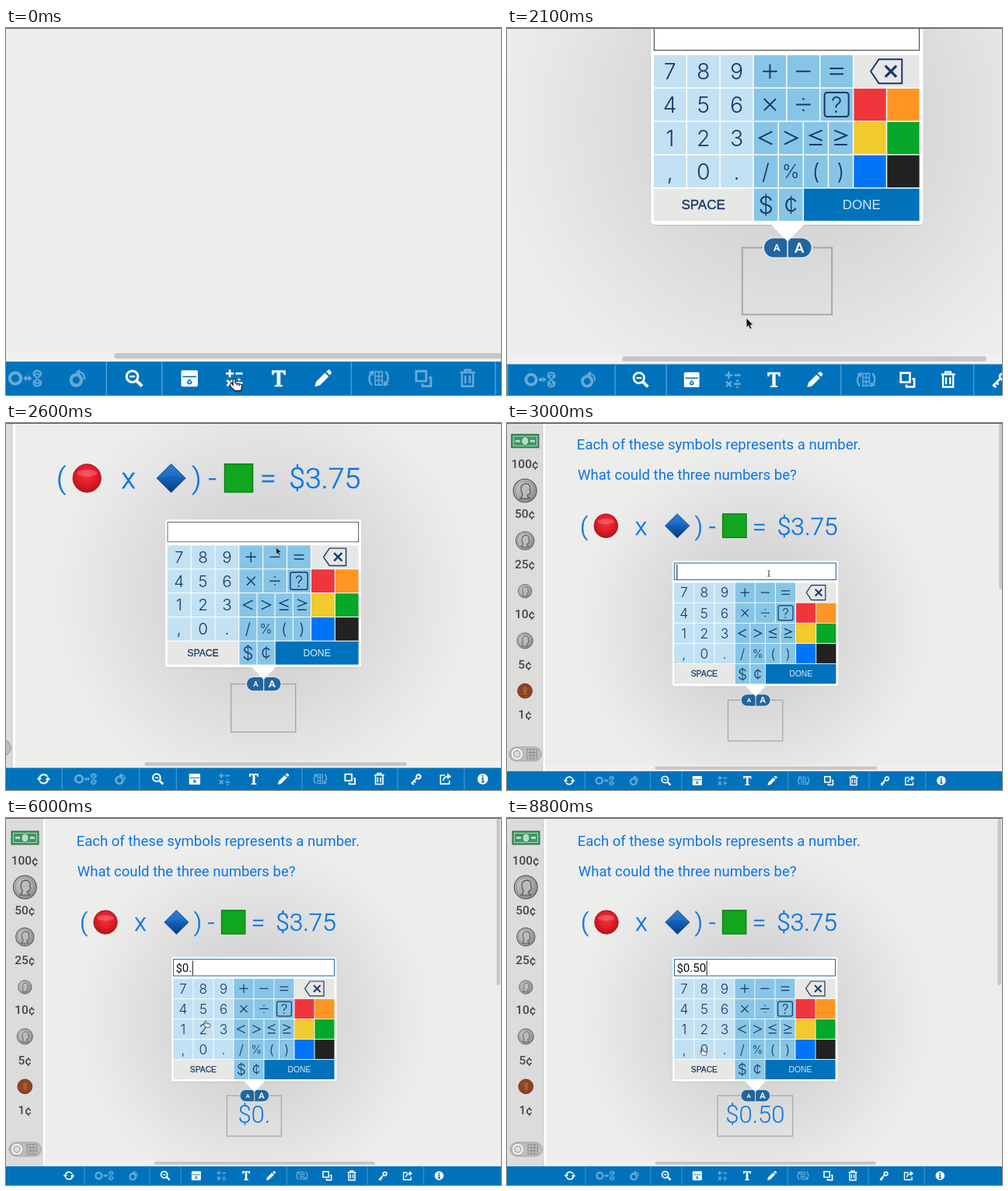
These frames come from a looping animation (637 by 472 pixels, 8.9 s). An HTML page:

```html
<!DOCTYPE html>
<html lang="en">
<head>
<meta charset="utf-8">
<title>Symbol puzzle keypad</title>
<style>
  html, body { margin: 0; width: 100%; height: 100%; overflow: hidden; background: #ededeb; }
  svg { display: block; width: 637px; height: 472px; }
  text { font-family: Roboto, "Liberation Sans", sans-serif; white-space: pre; }
  .mid { text-anchor: middle; }
  .blue { fill: #0a75e6; }
  .price { font-size: 15.4px; font-weight: 500; fill: #444; text-anchor: middle; }
  .key { font-family: Inter, "Liberation Sans", sans-serif; font-weight: 300; fill: #17386a; text-anchor: middle; }
  .word { font-family: "Liberation Sans", Arial, sans-serif; font-weight: 400; }
  .op { fill: none; stroke: #17386a; }
  .line { fill: none; stroke: #fff; }
  .solid { fill: #fff; }
  .dim { opacity: .4; }
  .cursor { stroke-linejoin: round; }
</style>
</head>
<body>
<svg viewBox="0 0 637 472">
  <defs>
    <radialGradient id="shade">
      <stop offset="0" stop-color="#cfcfcf"/>
      <stop offset=".4" stop-color="#d6d6d6"/>
      <stop offset=".65" stop-color="#e0e0e0"/>
      <stop offset=".85" stop-color="#e8e8e8"/>
      <stop offset="1" stop-color="#ededeb"/>
    </radialGradient>
    <radialGradient id="ball" cx=".5" cy=".4" r=".65">
      <stop offset="0" stop-color="#ee3a44"/>
      <stop offset=".5" stop-color="#e01e28"/>
      <stop offset="1" stop-color="#ab0f17"/>
    </radialGradient>
    <linearGradient id="gem" x2="0" y2="1">
      <stop offset="0" stop-color="#2179d0"/>
      <stop offset=".5" stop-color="#1460b8"/>
      <stop offset="1" stop-color="#0a3a80"/>
    </linearGradient>
    <linearGradient id="silver" x2="1" y2="1">
      <stop offset="0" stop-color="#d0d0d0"/>
      <stop offset="1" stop-color="#8c8c8c"/>
    </linearGradient>
    <g id="coin">
      <circle r="9.5" fill="url(#silver)" stroke="#5f5f5f" stroke-width=".9"/>
      <circle r="7.9" fill="none" stroke="#858585" stroke-width=".6"/>
      <path d="M-4 6.5Q-1 4-2.6 1.5Q-5-5 .8-5.8Q5-5.4 4-1L4.6 1L3.6 3Q1.5 3 2 4.5L4 6.5Z" fill="#bcbcbc" stroke="#606060" stroke-width=".9"/>
    </g>
  </defs>

  <rect width="637" height="472" fill="#ededeb"/>
  <g id="world">
    <circle class="pop" cx="319.3" cy="259" r="230" fill="url(#shade)"/>

    <g class="blue">
      <text x="90.7" y="35.9" font-size="18.5">Each of these symbols represents a number.</text>
      <text x="91.8" y="75" font-size="18.5">What could the three numbers be?</text>
      <g font-size="31.6" font-weight="300" stroke="#0a75e6" stroke-width=".4">
        <text class="mid" x="100" y="145.3">(</text>
        <text class="mid" x="173" y="145.3">x</text>
        <text class="mid" x="247" y="145.3">)</text>
        <text class="mid" x="264" y="145.3">-</text>
        <text class="mid" x="324.5" y="145.3">=</text>
        <text x="347.2" y="145.3">$3.75</text>
      </g>
    </g>
    <circle cx="128" cy="134" r="15.3" fill="url(#ball)" stroke="#a3161c" stroke-width=".7"/>
    <ellipse cx="128" cy="128.5" rx="11" ry="3.6" fill="#ff9a9a" opacity=".35"/>
    <path d="M219.3 118.5L235 134L219.3 149.5L203.7 134Z" fill="url(#gem)" stroke="#0c4388" stroke-width=".7"/>
    <path d="M219.3 119L234 133.5L219.3 131L204.5 133.5Z" fill="#58a8ee" opacity=".15"/>
    <rect x="277.4" y="118.7" width="30.4" height="30.4" fill="#10a61e" stroke="#087a14" stroke-width="1.2"/>

    <!-- money tray -->
    <rect x="47" y="0" width="3.2" height="448" fill="#fff"/>
    <rect width="47.2" height="448" fill="#dcdcdb"/>
    <path d="M47 0V448" stroke="#c2c2c2" stroke-width=".7"/>
    <rect x="7" y="17" width="35" height="17" fill="#3f9464" stroke="#276c47"/>
    <rect x="9.5" y="19.5" width="30" height="12" fill="none" stroke="#a8d5b7"/>
    <ellipse cx="24.5" cy="25.5" rx="4.5" ry="5.5" fill="#b6dcc2" stroke="#276c47" stroke-width=".7"/>
    <path d="M12 25.5H18M31 25.5H37" stroke="#b6dcc2" stroke-width="3"/>
    <use href="#coin" transform="translate(24.3 89) scale(1.56)"/>
    <use href="#coin" transform="translate(24.3 153) scale(1.22)"/>
    <use href="#coin" transform="translate(24.3 217.5) scale(.92)"/>
    <use href="#coin" transform="translate(24.3 281) scale(1.06)"/>
    <circle cx="24.3" cy="345.3" r="9.4" fill="#8f4524" stroke="#5f2a14" stroke-width=".8"/>
    <path d="M20 351Q23 348 21 345Q20 339 25 339Q29 340 28 345L27 348L29 351Z" fill="#a85a34" stroke="#64301a" stroke-width=".6"/>
    <g id="prices"></g>
    <rect x="4" y="417" width="41.5" height="18" rx="9" fill="#bdbdbd" stroke="#999" stroke-width=".8"/>
    <circle cx="14" cy="426" r="7.6" fill="#f4f4f4" stroke="#999" stroke-width=".7"/>
    <circle cx="14" cy="426" r="4.2" fill="#ddd" stroke="#888"/>
    <g fill="none" stroke="#777"><rect x="27" y="419.8" width="12.5" height="12.5" stroke-dasharray="2 1"/><path d="M28 424H39M28 428H39M31.3 420V432M35.3 420V432" stroke-width=".7"/></g>

    <!-- scrollbars -->
    <rect x="50.2" y="440.5" width="586.8" height="7.5" fill="#f0f0ef"/>
    <rect x="190.5" y="441.8" width="284.5" height="4" rx="2" fill="#c6c6c6"/>
    <rect x="631.3" y="1" width="4.6" height="214" rx="2.2" fill="#c8c8c8"/>

    <!-- toolbar -->
    <rect y="448" width="637" height="25" fill="#0072bc"/>
    <path d="M101 448V472M185 448V472M225 448V472M361.3 448V472M465 448V472M537.3 448V472" stroke="#4a9dd2" stroke-width=".9"/>
    <g stroke-width="1.7">
      <g transform="translate(81 460)">
        <path class="line" d="M-4.6-1A4.7 4.7 0 0 1 4-2.5M4.6 1A4.7 4.7 0 0 1-4 2.5"/>
        <path class="solid" d="M-7.4-1H-2L-4.7 2.6ZM7.4 1H2L4.7-2.6Z"/>
      </g>
      <g class="dim" transform="translate(126 460)">
        <circle class="line" cx="-6.6" r="4" stroke-width="2.3"/>
        <path class="line" d="M0 0H4" stroke-width="1.2"/>
        <path class="solid" d="M-1 0L1.6-2.2V2.2ZM5.4 0L2.8-2.2V2.2Z"/>
        <path class="line" d="M7-1.5Q5.5-5 9-5.6Q13-5 11.5-1.5M7 1.5Q5.5 5 9 5.6Q13 5 11.5 1.5" stroke-width="1.3"/>
        <circle class="line" cx="9.2" cy="-2" r="1.5" stroke-width="1"/><circle class="line" cx="9.2" cy="2.2" r="1.5" stroke-width="1"/>
      </g>
      <g class="dim" transform="translate(164 460)">
        <circle class="line" cx="-.8" cy="1.3" r="3.8" stroke-width="2.3"/>
        <path class="line" d="M1-4.4Q5.5-4.5 5.2 1" stroke-width="1.2"/>
        <path class="solid" d="M-1.4-4.3L2-6.6V-2.2Z"/>
      </g>
      <g class="line" transform="translate(205 460)">
        <circle cx="-1.4" cy="-1.3" r="4.1"/><path d="M-3.4-1.3H.6" stroke-width="1.3"/><path d="M1.7 1.8L5.6 5.6" stroke-width="2.3"/>
      </g>
      <g transform="translate(244.8 460)">
        <rect class="solid" x="-6" y="-5.8" width="12" height="11.8" rx="1"/>
        <path d="M-5-1.2H5" stroke="#0072bc" stroke-width=".9"/>
        <path d="M0 .3L1.8 2.6Q1.6 4.4 0 4.4Q-1.6 4.4-1.8 2.6Z" fill="#0072bc"/>
        <circle class="solid" cy="2.7" r=".7"/>
      </g>
      <path id="calc" class="line" transform="translate(277 460)" d="M-6-3.5H-.4M-3.2-6.3V-.7M1-3.5H6M-5.2 1.4L-1.2 5.4M-1.2 1.4L-5.2 5.4M1 3.4H6M2.7 .9H4.3M2.7 5.9H4.3" stroke-width="1.5"/>
      <path class="solid" transform="translate(309 460)" d="M-5-5.8H5V-2.4H3.8Q3.5-4.4 1.3-4.4V4.6L2.9 5V6H-2.9V5L-1.3 4.6V-4.4Q-3.5-4.4-3.8-2.4H-5Z"/>
      <path class="solid" transform="translate(341 460)" d="M-6 6L-5 2.3L1.3-4L4 -1.3L-2.3 5ZM2.2-4.8L3.6-6Q4.5-6.4 5.3-5.4Q6.4-4.5 6-3.6L4.8-2.2Z"/>
      <g class="dim" transform="translate(381 460)">
        <path class="line" d="M-2.6-4.8H2.6V4.8H-2.6ZM-2.6-1.6H2.6M-2.6 1.6H2.6M0-4.8V4.8" stroke-width=".9"/>
        <path class="line" d="M-5 5Q-8.6 0-5-4M5-5Q8.6 0 5 4" stroke-width="1.4"/>
        <path class="solid" d="M-7.3-4.5L-3.4-5.8L-3.8-1.8ZM7.3 4.5L3.4 5.8L3.8 1.8Z"/>
      </g>
      <path class="line wake" transform="translate(413 460)" d="M-5-5.2H2.2V2H-5ZM4-.5H5.6V5.6H-.5V3.8" stroke-width="1.6"/>
      <path class="line wake" transform="translate(445 460)" d="M-5.4-4.2H5.4M-2-4.5V-6H2V-4.5M-4-4V5.7H4V-4M-1.6-1.8V3.6M1.6-1.8V3.6" stroke-width="1.4"/>
      <g class="line" transform="translate(485 460)">
        <circle cx="2.6" cy="-2.4" r="2.3"/><path d="M1-1L-5 5M-4.6 4.5L-2.5 6M-2.5 2.3L-.6 3.8"/>
      </g>
      <g transform="translate(516.5 460)">
        <path class="line" d="M0-4H-5V5.3H4.6V1.6M-2 2Q-1.5-2.5 3-2.8" stroke-width="1.4"/><path class="solid" d="M2.4-6.3L6.6-2.8L2.4 .6Z"/>
      </g>
      <circle class="solid" cx="557.3" cy="460" r="5.8"/>
      <path d="M557.3 456V457.7M556 459.2H557.4V463.3M555.8 463.3H559" fill="none" stroke="#0072bc" stroke-width="1.5"/>
    </g>

    <!-- answer box and keypad -->
    <g class="pop">
      <rect id="box" y="357" height="52.2" fill="none" stroke="#a6a6a9" stroke-width="1.2"/>
      <text id="answer" class="blue mid" x="319.3" y="391.6" font-size="31" font-weight="300"></text>
      <rect x="212.4" y="179.4" width="213.6" height="160.6" rx="4" opacity=".1"/>
      <path d="M306 338H333.4L319.7 352.5Z" fill="#fff"/>
      <rect x="212.8" y="178.8" width="212.8" height="160.3" rx="3.2" fill="#fff"/>
      <rect id="field" x="215.5" y="181.6" width="207" height="21.4" fill="#fff"/>
      <text id="typed" x="218.4" y="198" font-size="15" fill="#111"></text>
      <path id="caret" stroke="#111" stroke-width="1"/>
      <g id="keys" stroke-width="1.2"></g>
      <rect x="300.9" y="349.3" width="37.8" height="15.6" rx="7.8" fill="#22659f" stroke="#e4e8ec" stroke-width="1"/>
      <path d="M319.7 349V365" stroke="#e4e8ec" stroke-width="1"/>
      <path d="M314 346L319.7 352.5L325.4 346Z" fill="#fff"/>
      <g class="mid" fill="#eef4f9" font-weight="700"><text x="311.2" y="360" font-size="8">A</text><text x="328.8" y="361" font-size="11.5">A</text></g>
    </g>

    <g id="pointer" stroke-width=".6">
      <path class="cursor" data-kind="hand" d="M-.8 5V.9A.8.8 0 0 1 .8.9V3.3L4.6 4Q5.8 4.3 5.6 5.6L4.9 8.8H.8L-2.5 6Q-3-.1-.8 5ZM2.2 3.7V5M3.7 4V5.3" fill="#fff" stroke="#111"/>
      <path class="cursor" data-kind="arrow" d="M0 0V7.4L1.7 5.9L2.9 8.6L4.2 8L3 5.4H5.3Z" fill="#111" stroke="#eee" stroke-width=".4"/>
      <path class="cursor" data-kind="beam" d="M-1.6-3.8Q0-3.8 0-2.8Q0-3.8 1.6-3.8M0-2.8V2.8M-1.6 3.8Q0 3.8 0 2.8Q0 3.8 1.6 3.8M-.8.8H.8" fill="none" stroke="#222" stroke-width=".8"/>
    </g>
  </g>
  <rect width="637" height="1" fill="#5a5a5c"/>
</svg>

<script>
const LOOP = 8900, STEP = 100, BLINK = 337;
const $ = id => document.getElementById(id);
const all = sel => document.querySelectorAll(sel);

$('prices').innerHTML = [100, 50, 25, 10, 5, 1].map((n, i) =>
  `<text class="price" x="24.3" y="${60 + i * 64.15}">${n}¢</text>`).join('');

// Keypad: a grid of square cells; the operator block also holds narrower cells.
const CELL = 26.02, GAP = .9, LEFT = 214.85, TOP = 206.4;
const PALE = '#c2e1f3', SKY = '#87c5e6', GREY = '#e7e7e5';
const OPS = {
  '+': 'M-5.6 0H5.6M0-5.6V5.6',
  '−': 'M-5.6 0H5.6',
  '=': 'M-5.4-2.2H5.4M-5.4 2.2H5.4',
  '×': 'M-4.6-4.6L4.6 4.6M4.6-4.6L-4.6 4.6',
  '÷': 'M-5.6 0H5.6M-.8-4.3H.8M-.8 4.3H.8',
  '<': 'M5-5L-5 0L5 5',
  '>': 'M-5-5L5 0L-5 5',
  '≤': 'M5-6L-4.6-2L5 2M-5 5.2H5',
  '≥': 'M-5-6L4.6-2L-5 2M-5 5.2H5',
  '⌫': 'M-12.4 0L-6-9.4H12V9.4H-6Z'
};

function face(label, cx, cy) {
  const at = `transform="translate(${cx} ${cy})"`;
  if (OPS[label]) {
    const cross = label === '⌫' ? '<path class="op" d="M-1-4.3L7.6 4.3M7.6-4.3L-1 4.3" stroke-width="2"/>' : '';
    return `<g ${at}><path class="op" d="${OPS[label]}"/>${cross}</g>`;
  }
  if (label.length > 1) {
    const ink = label === 'DONE' ? 'fill:#d8eaf6' : 'stroke:#17386a;stroke-width:.25';
    return `<text class="key word" x="${cx}" y="${cy + 3.7}" font-size="10.3" style="${ink}">${label}</text>`;
  }
  const size = '$¢'.includes(label) ? 19 : label === '%' ? 14.5 : 17.2;
  const frame = label === '?' ? `<rect class="op" x="-9.4" y="-9.4" width="18.8" height="18.8" rx="2" ${at}/>` : '';
  return `${frame}<text class="key" x="${cx}" y="${cy + size * .364}" font-size="${size}">${label}</text>`;
}

function cell(col, row, span, fill, label) {
  const x = LEFT + col * CELL, y = TOP + row * CELL, w = span * CELL;
  return `<rect x="${x + GAP / 2}" y="${y + GAP / 2}" width="${w - GAP}" height="${CELL - GAP}" fill="${fill}"/>` +
    (label ? face(label, x + w / 2, y + CELL / 2) : '');
}

const run = (chars, col, row, span, fill) =>
  [...chars].map((c, i) => cell(col + i * span, row, span, fill, c)).join('');

$('keys').innerHTML =
  ['789', '456', '123', ',0.'].map((r, i) => run(r, 0, i, 1, PALE)).join('') +
  run('+−=', 3, 0, 1, SKY) + run('×÷?', 3, 1, 1, SKY) +
  run('<>≤≥', 3, 2, .75, SKY) + run('/%()', 3, 3, .75, SKY) + run('$¢', 3, 4, .75, SKY) +
  ['#ef363d', '#ff9624', '#f1ca2d', '#05a829', '#0074f6', '#222223']
    .map((c, i) => cell(6 + i % 2, 1 + (i >> 1), 1, c)).join('') +
  cell(6, 0, 2, GREY, '⌫') + cell(0, 4, 3, GREY, 'SPACE') + cell(4.5, 4, 3.5, '#0072bc', 'DONE');

// Each entry: time of the click or key press, text in the field from then on.
const ENTRIES = [[2990, ''], [4450, '$'], [5250, '$0'], [5680, '$0.'], [6150, '$0.5'], [6750, '$0.50']];

// Pointer tip: time, x, y
const PATH = [
  [0, 276.9, 460.2], [600, 276.9, 460.2], [700, 276.3, 460.2], [1700, 276.3, 460.2],
  [2100, 287.5, 412], [2600, 333.3, 209], [2900, 336.6, 195], [3500, 336.6, 195],
  [4400, 303, 321], [4700, 303, 321], [5100, 253, 297], [5300, 253, 297],
  [5600, 280, 298], [5700, 280, 298], [6000, 257, 260.5], [6100, 255.5, 247],
  [6200, 255.5, 247], [6600, 251.5, 296.5], [LOOP, 251.5, 296.5]
];

function pointAt(t) {
  const i = PATH.findIndex(p => p[0] > t);
  const [t0, x0, y0] = PATH[i - 1], [t1, x1, y1] = PATH[i];
  const k = (t - t0) / (t1 - t0);
  return [x0 + (x1 - x0) * k, y0 + (y1 - y0) * k];
}

function zoomAt(t) {
  const p = Math.min(1, Math.max(0, (t - 1685) / 1395));
  const eased = p < .5 ? 2 * p * p : 1 - 2 * (1 - p) ** 2;
  return 1.7875 - .7875 * eased;
}

function draw(t) {
  $('world').setAttribute('transform', `translate(255.8 472) scale(${zoomAt(t)}) translate(-255.8 -472)`);

  const shown = t < 1100 ? 0 : t < 1200 ? .6 : 1;
  all('.pop').forEach(el => el.style.opacity = shown);
  all('.wake').forEach(el => el.style.opacity = t < 1100 ? .4 : 1);
  $('calc').style.opacity = t < 900 ? 1 : .4;

  const entry = ENTRIES.filter(e => e[0] <= t).pop();
  const text = entry ? entry[1] : '';
  $('typed').textContent = $('answer').textContent = text;
  const answerWidth = text ? $('answer').getComputedTextLength() : 0;
  const boxWidth = Math.max(70, answerWidth + 20.5);
  $('box').setAttribute('x', 319.3 - boxWidth / 2);
  $('box').setAttribute('width', boxWidth);

  $('field').setAttribute('stroke', entry ? '#2a6db3' : '#4a4a4a');
  $('field').setAttribute('stroke-width', entry ? 1.1 : .7);
  const caretX = 219 + (text ? $('typed').getComputedTextLength() + .4 : 0);
  $('caret').setAttribute('d', `M${caretX} 183.5V202.3`);
  const lit = entry && Math.floor((t - entry[0]) / BLINK) % 2 === 0;
  $('caret').style.visibility = lit ? 'visible' : 'hidden';

  const kind = t < 1800 || t >= 3700 ? 'hand' : t < 2800 ? 'arrow' : 'beam';
  $('pointer').setAttribute('transform', `translate(${pointAt(t)})`);
  all('.cursor').forEach(el => el.style.display = el.dataset.kind === kind ? '' : 'none');
}

const start = performance.now();
function tick() {
  const t = (performance.now() - start) % LOOP;
  draw(Math.floor(t / STEP) * STEP);
  requestAnimationFrame(tick);
}
tick();
</script>
</body>
</html>
```
